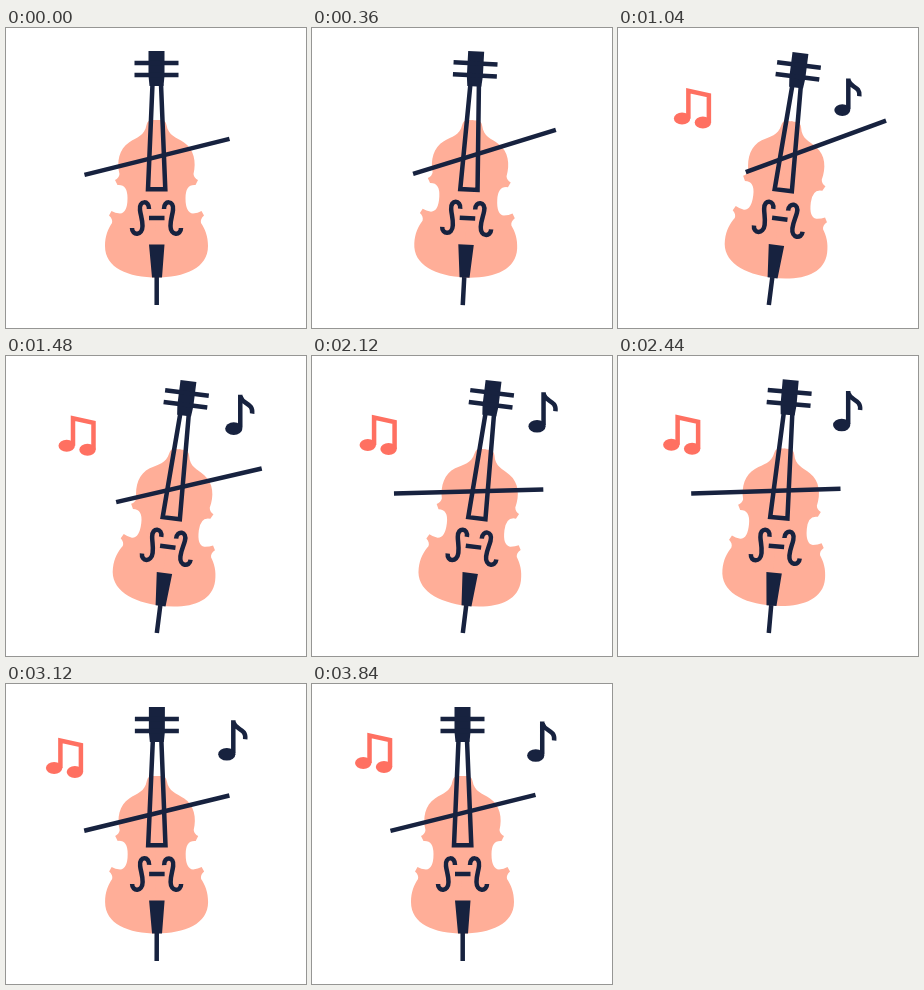
An HTML page that plays this animation: 300 by 300 pixels, repeating every 3880 ms.

```html
<!DOCTYPE html>
<html lang="en">
<head>
<meta charset="utf-8">
<title>Cello</title>
<style>
  html, body { margin: 0; width: 100%; height: 100%; overflow: hidden; background: #fff; }
  svg { display: block; width: 100%; height: 100%; }
  .line { fill: none; stroke: #17223f; stroke-width: 4.5; vector-effect: non-scaling-stroke; }
  .navy { fill: #17223f; }
  .coral { fill: #ff7061; }
  .coral .line { stroke: #ff7061; }
</style>
</head>
<body>
<svg viewBox="0 0 300 300">
  <g id="cello">
    <g fill="#ffae98">
      <path id="half" d="M151.5 92H146Q141.5 92 140.5 97C138.5 108 131 109 123 114.5C113 121 110.5 134 113.5 146
        Q113 150 109 152L111.5 157Q121.5 156 121.5 170Q121.5 185 114 185.5Q109 185 105.5 183L103 187.5
        Q107 191 106 195C102 201 99 208 99 218C99 240 122 249.5 151.5 249.5Z"/>
      <use href="#half" transform="matrix(-1 0 0 1 301 0)"/>
    </g>
    <path class="navy" d="M142.5 23H158.500V48L157.500 58H143.500L142.500 48ZM143 216.500H158.500L156 249.500H146Z"/>
    <path class="line" d="M128.500 35H172.500M128.500 47H172.500M146.500 56L142 161.300H159.300L155 56M143 190H158.500M150.700 249V277"/>
    <path id="fhole" class="line" d="M143 181C143.500 172 132.500 172 134 182C134.500 187 136.500 191 136.500 198C136.500 208 126 208 126 200"/>
    <use href="#fhole" transform="matrix(-1 0 0 1 301 0)"/>
    <path id="bow" class="line" d="M-74.700 0H74.700"/>
  </g>
  <g id="pair" class="coral">
    <path class="line" d="M-4 10.500V-17L16.500 -12.500V14.500"/>
    <ellipse cx="-10.300" cy="10.500" rx="8.200" ry="6"/>
    <ellipse cx="10.500" cy="14.500" rx="8.200" ry="6"/>
  </g>
  <g id="single" class="navy">
    <path class="line" d="M.8 13V-20M1 -18C3 -10 14 -12 12.700 -1"/>
    <ellipse cx="-5.700" cy="14" rx="8.600" ry="6.300"/>
  </g>
</svg>
<script>
const LOOP = 3880;
const mix = (a, b, p) => a + (b - a) * p;
const progress = (t, start, end) => Math.min(1, Math.max(0, (t - start) / (end - start)));
const smooth = (t, start, end) => {
  const p = progress(t, start, end);
  return p * p * (3 - 2 * p);
};

const place = (id, transform) =>
  document.getElementById(id).setAttribute("transform", transform);

function drawCello(t) {
  const lean = 7.2 * (smooth(t, 0, 800) - smooth(t, 2000, 3200));
  place("cello", `rotate(${lean} 150.5 278)`);
}

// The bow goes from rest to the right, across to the left, and back to rest.
function drawBow(t) {
  const pull = smooth(t, 0, 800), push = smooth(t, 800, 2400), back = smooth(t, 2400, 3200);
  const stroke = (rest, right, left, across = push) =>
    mix(mix(mix(rest, right, pull), left, across), rest, back);
  const slide = stroke(0.5, 33.4, -15.3);
  const angle = stroke(-13.9, -28.7, -6.8);
  const contact = stroke(129, 126.7, 134.2, 1 - (1 - push) ** 2);
  place("bow", `translate(150.5 ${contact}) rotate(${angle}) translate(${slide} 0)`);
}

// A note grows out of the cello, then drifts: left until 3120 ms, up or down with a bend at 2440 ms.
function drawNote(id, t, start, origin, [x0, x1, x2], [y0, y1, y2]) {
  const out = start + 480;
  const drift = (a, b, c, turn) => mix(mix(a, b, progress(t, out, turn)), c, progress(t, turn, LOOP));
  const grow = smooth(t, start, out);
  const x = mix(origin, drift(x0, x1, x2, 3120), grow);
  const y = mix(186, drift(y0, y1, y2, 2440), grow);
  place(id, `translate(${x} ${y}) scale(${grow})`);
}

function tick() {
  const t = performance.now() % LOOP;
  drawCello(t);
  drawBow(t);
  drawNote("pair", t, 480, 146, [75, 58.4, 61.7], [80, 78.2, 68.3]);
  drawNote("single", t, 640, 160, [235, 226.5, 229.6], [60, 55, 57.5]);
  requestAnimationFrame(tick);
}
tick();
</script>
</body>
</html>
```
